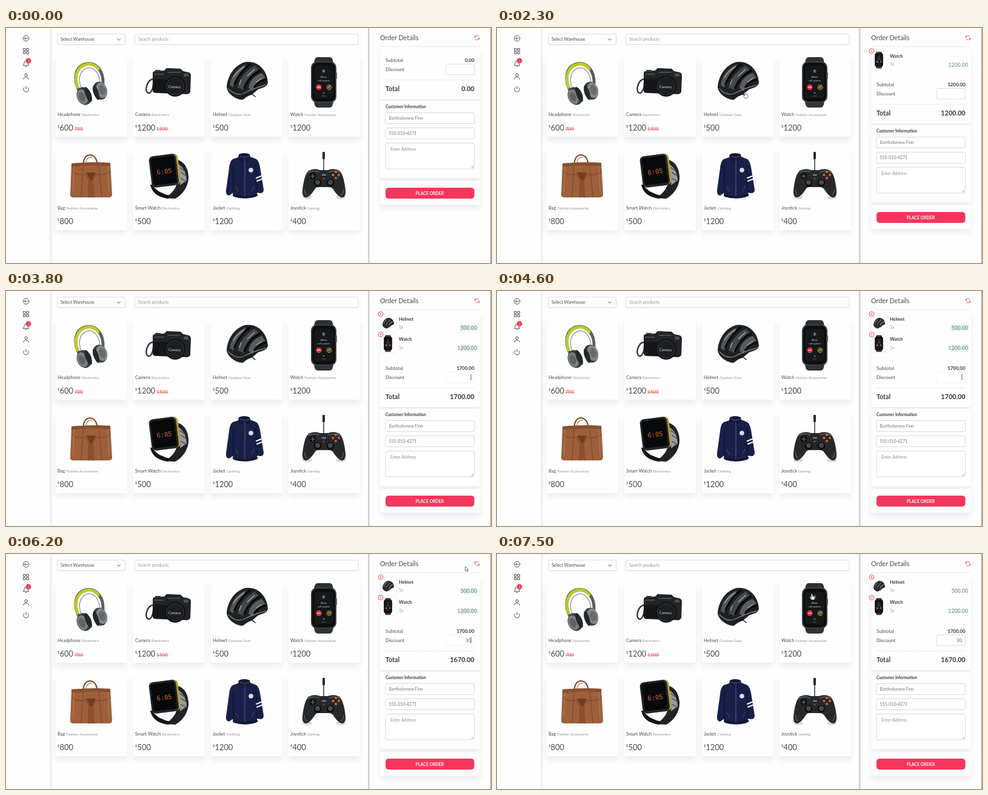
Recreate the animation shown at these times as an HTML page. Size 800 px wide and 387 px high, loop 8000 ms.

```html
<!DOCTYPE html>
<html lang="en">
<head>
<meta charset="utf-8">
<title>Point of sale</title>
<style>
html, body { margin: 0; width: 100%; height: 100%; overflow: hidden; background: #fefefe; }
svg { display: block; width: 100vw; height: 100vh; font-family: Lato, "Open Sans", sans-serif; fill: #4a4a4a; }
.line { fill: none; stroke: #505050; stroke-width: 1; stroke-linecap: round; stroke-linejoin: round; }
.box { fill: #fff; stroke: #d6d6d6; stroke-width: .9; }
.card { fill: #fefefe; filter: url(#soft); }
.bold { font-weight: 700; fill: #383838; }
.mute { fill: #929292; }
.red { fill: none; stroke: #e2474c; stroke-width: .9; }
.end { text-anchor: end; }
.mid { text-anchor: middle; }
</style>
</head>
<body>
<svg id="stage" viewBox="0 0 800 387" preserveAspectRatio="none"></svg>
<script>
const LOOP = 8000;
const stage = document.getElementById('stage');

const text = (x, y, size, str, cls = '', extra = '') =>
  `<text x="${x}" y="${y}" font-size="${size}" class="${cls}" ${extra}>${str}</text>`;
const rect = (x, y, w, h, r, attrs) =>
  `<rect x="${x}" y="${y}" width="${w}" height="${h}" rx="${r}" ${attrs}/>`;
const path = (d, attrs) => `<path d="${d}" ${attrs}/>`;
const dot = (x, y, r, fill) => `<circle cx="${x}" cy="${y}" r="${r}" fill="${fill}"/>`;
const oval = (x, y, rx, ry, fill) => `<ellipse cx="${x}" cy="${y}" rx="${rx}" ry="${ry}" fill="${fill}"/>`;
const turn = (deg, x, y, body) => `<g transform="rotate(${deg} ${x} ${y})">${body}</g>`;
const stroke = (color, width) =>
  `fill="none" stroke="${color}" stroke-width="${width}" stroke-linecap="round" stroke-linejoin="round"`;
const fill = color => `fill="${color}"`;

// Each drawing sits at its place in the shop grid.
const art = {
  headphone:
    path('M121 104C110 84 114 63 132 59C150 56 161 72 160 92', stroke('#5b5e61', 5)) +
    path('M118 97C112 80 117 64 132 60C140 58 147 61 152 67', stroke('#bccb27', 5)) +
    path('M124 99C118 83 122 70 134 66C146 63 154 76 155 90', stroke('#9da0a1', 1.6)) +
    turn(-22, 129, 112, oval(129, 112, 12, 15, '#3b3e41') + oval(126, 112, 8.5, 12.5, '#7c7f81') +
      oval(125, 112, 5, 8, '#5e6264') + oval(136, 112, 4.5, 13, '#25282a')) +
    turn(-18, 156, 103, oval(155, 103, 11.5, 15, '#3a3d40') + oval(158, 103, 9, 13, '#858889') +
      oval(159, 103, 5.5, 8.5, '#676b6d') + oval(148, 104, 4, 12.5, '#25282a')),
  camera:
    path('M243 84C233 85 229 101 233 106C238 111 243 100 243 91', stroke('#34363a', 2.4)) +
    path('M242 75Q242 71 246 71L261 70L265 66L288 67L292 71L301 73Q305 74 305 79L304 105Q303 108 299 109L247 107Q242 107 242 102Z', fill('#212327')) +
    path('M242 84L265 84L265 107L246 106Q242 106 242 102Z', fill('#15161a')) +
    path('M267 73L287 73M245 76L260 76', stroke('#56595d', 1.4)) +
    rect(246, 69, 9, 3, 1, fill('#36393d')) + rect(293, 75, 8, 5, 1, fill('#4a4d52')) +
    dot(279, 96, 17, '#0e0f12') +
    '<circle cx="279" cy="96" r="14.5" fill="#1c1e21" stroke="#3c3f43"/>' +
    text(278, 99, 6, 'Camera', 'mid', 'style="fill:#e2e2e2" transform="rotate(2 278 97)"'),
  helmet:
    path('M364 98C365 80 376 61 395 56C416 53 431 70 432 90C430 98 423 98 416 101L405 110Q399 111 391 118C382 119 366 110 364 98Z', fill('#1f2123')) +
    path('M369 94C371 79 382 65 396 60L390 71C381 79 376 88 375 98Z', fill('#54575a')) +
    path('M382 98C384 84 396 70 410 62L417 68C404 76 394 87 392 102Z', fill('#45484b')) +
    path('M400 99C402 86 410 78 422 74L428 82C416 86 409 93 407 103Z', fill('#5a5d60')) +
    path('M377 92Q385 73 402 60M393 99Q400 80 419 70M410 97Q416 88 428 85', stroke('#08090a', 3.2)) +
    path('M367 100Q378 112 391 108Q406 100 428 94', stroke('#7c7f82', 1.3)) +
    path('M375 81Q382 70 393 64M398 79L410 68M413 89L422 83M385 93L388 85', stroke('#b2b4b6', 1.1)) +
    path('M388 113L405 108L411 113', stroke('#17181a', 1.6)),
  watch:
    path('M507 62L509 53Q510 48 515 48L533 48Q538 48 539 53L541 62Z', fill('#2e3033')) +
    path('M507 116L509 126Q510 131 515 131L533 131Q538 131 539 126L541 116Z', fill('#303235')) +
    rect(503, 55, 42, 68, 10, fill('#3d4043')) + rect(505, 57, 38, 64, 8.5, fill('#0c0d0e')) +
    rect(544, 73, 2, 11, 1, fill('#5a5d60')) + rect(508, 62, 32, 54, 6, fill('#151719')) +
    dot(524, 71, 3, '#3d4144') + path('M524 69.5V72.5', stroke('#d4d8da', 1)) +
    text(524, 82, 4.2, 'Allow', 'mid', 'style="fill:#d5d5d5"') +
    text(524, 87.5, 4.2, 'call system', 'mid', 'style="fill:#d0d0d0"') +
    dot(516, 97.5, 4.7, '#e5333c') + path('M513.8 98Q516 96 518.2 98', stroke('#fff', 1.1)) +
    '<circle cx="533" cy="97.5" r="4" fill="#5c4a25" stroke="#d4b44b" stroke-dasharray="2 1"/>' +
    path('M531 98L535 96', stroke('#f0dfa0', .9)) +
    dot(524, 107, .9, '#bbb') + path('M521 112H527', stroke('#66696c', .8)),
  bag:
    path('M127 230C127 214 132 209 139 209C147 210 151 218 151 231', stroke('#7d4828', 2.2)) +
    path('M131 226C132 215 136 212 142 213', stroke('#b97b50', 1.2)) +
    path('M108 223Q140 220 172 222L175 274Q175 279 169 279L111 279Q105 279 106 273Z', fill('#9d603a')) +
    path('M108 223Q140 220 172 222L172 228Q140 224 108 229Z', fill('#865031')) +
    path('M109 236Q118 244 131 241L137 250L136 279M172 236Q162 244 149 241L143 250L145 279', stroke('#7d4727', 1.2)) +
    path('M132 238L148 238L142 251L139 251Z', fill('#6f3d22')) +
    path('M137 251L143 251L145 279L136 279Z', fill('#8b5230')) +
    path('M127 224L124 278M153 224L158 278', stroke('#88502e', 1.8)) +
    path('M112 228L111 270M168 228L170 270', stroke('#b0744b', 1.5)),
  smart:
    path('M276 217C290 215 300 227 301 244C302 258 293 274 279 281L262 280C277 271 284 259 283 244Z', fill('#202225')) +
    path('M284 224Q297 232 298 251L287 259Q289 243 279 231Z', fill('#9a9c9e')) +
    path('M287 230L294 235M289 238L297 243M289 248L297 252', stroke('#55585b', 1.8)) +
    path('M241 258Q250 272 271 276L268 281Q242 278 238 258Z', fill('#131416')) +
    turn(-7, 261, 236, rect(241, 209, 45, 51, 7, fill('#b79c38')) +
      rect(238, 209, 45, 52, 7, fill('#232528')) + rect(241, 212, 39, 45, 4, fill('#08090b')) +
      text(261, 240, 10.5, '6:05', 'mid', 'style="font-family:\'DejaVu Sans Mono\',monospace;fill:#d9692f"')),
  jacket:
    path('M383 213Q394 204 403 212L413 216Q418 219 420 235L425 266Q425 272 419 272L414 271L414 277Q396 284 376 278L375 271L368 276Q362 275 363 267L368 231Q369 219 374 216Z', fill('#182047')) +
    path('M375 227L375 276M412 225L414 271', stroke('#0e1530', 1.6)) +
    path('M383 214L384 208Q393 204 402 208L403 213L394 222Z', fill('#131a38')) +
    path('M386 211Q394 215 401 211M394 216V279', stroke('#5f6a90', .9)) +
    path('M413 247L423 243M414 252L424 248', stroke('#eef0f3', 2.2)) +
    path('M376 276Q395 281 414 275', stroke('#0f1630', 3)) +
    path('M379 261L383 269M409 260L405 269', stroke('#434e73', 1)) + dot(404, 234, 3.8, '#d9dde5'),
  joystick:
    oval(497, 279, 8, 3, '#d9d9d9') + oval(552, 279, 8, 3, '#d9d9d9') +
    path('M524 234V215', stroke('#35373a', 1.5)) + rect(522, 204, 4, 12, 1, fill('#292b2e')) +
    path('M499 235Q509 230 518 234L531 234Q541 230 550 235Q557 241 560 267Q561 280 553 279Q547 277 540 266Q537 262 533 262H515Q511 262 509 266Q502 277 496 279Q488 280 489 267Q492 241 499 235Z', fill('#26282a')) +
    path('M498 238Q508 233 516 237M533 237Q542 233 551 238', stroke('#606366', 1.5)) +
    path('M492 266Q493 272 496 275M557 266Q556 272 553 275', stroke('#4b4e51', 2)) +
    dot(506, 244, 5.5, '#0e0f11') + path('M503 244H509M506 241V247', stroke('#5d6064', 1.6)) +
    [514, 535].map(x => dot(x, 255, 6.2, '#0b0c0d') + dot(x, 254.2, 4, '#46494c')).join('') +
    [[544, 237], [539.5, 242], [549, 242], [544, 247]].map(([x, y]) => dot(x, y, 2, '#dd6530')).join('') +
    rect(521, 241, 7, 2, 1, fill('#898c8f')) + dot(524, 248, 1.2, '#c94b31')
};

const goods = [
  ['Headphone', 'Electronics', 600, 700], ['Camera', 'Electronics', 1200, 1500],
  ['Helmet', 'Outdoor Gear', 500], ['Watch', 'Fashion Accessories', 1200],
  ['Bag', 'Fashion Accessories', 800], ['Smart Watch', 'Electronics', 500],
  ['Jacket', 'Clothing', 1200], ['Joystick', 'Gaming', 400]
];

function product([name, kind, price, old], i) {
  const x = 85 + i % 4 * 128, y = i < 4 ? 0 : 154;
  const was = old ? `<tspan dx="2" font-size="8" fill="#df4a50" text-decoration="line-through">${old}</tspan>` : '';
  return text(x, y + 145, 7.45, `${name}<tspan dx="2" font-size="6" class="mute">${kind}</tspan>`) +
    text(x, y + 164.2, 6, '$') + text(x + 3.6, y + 169.4, 12.8, price + was);
}

const cards = goods.map((g, i) =>
  rect(82 + i % 4 * 128, 46 + (i < 4 ? 0 : 154), 118, 133, 2, 'class="card"')).join('');

const sidebar =
  rect(72, 0, 6, 387, 0, 'fill="url(#edge)"') +
  `<g class="line"><circle cx="33" cy="17" r="4.7"/>` +
  path('M35.5 17H30.5M32.5 15L30.5 17L32.5 19', '') +
  [[28.7, 33.7], [34, 33.7], [28.7, 39], [34, 39]].map(([x, y]) => rect(x, y, 3.5, 3.5, .3, '')).join('') +
  path('M28.5 61.5Q30 60 30 57.5Q30 54.5 33 54.5Q36 54.5 36 57.5Q36 60 37.5 61.5ZM32 63.3H34', '') +
  `<circle cx="33" cy="77.4" r="2.2"/>` + path('M28.8 84.2Q28.8 81 33 81Q37.2 81 37.2 84.2', '') +
  path('M33 96V100.5M30 98A4.2 4.2 0 1 0 36 98', '') + '</g>' +
  dot(37, 54, 4.4, '#f03350') + text(37, 56.1, 5.6, '2', 'mid', 'style="fill:#fff"');

const orderRow = (id, name, thumb) => `<g id="${id}">` +
  rect(618, 38, 26, 30, 2, 'fill="#fff" stroke="#ededed" stroke-width=".8"') + thumb +
  `<circle cx="618" cy="38" r="4" class="red" style="fill:#fff"/>` +
  path('M616.5 36.5L619.5 39.5M619.5 36.5L616.5 39.5', 'class="red"') +
  text(648, 48.5, 7.4, name, 'bold') + text(648, 62, 6.6, '1x', 'mute') +
  rect(748, 56, 30, 10, 3, 'class="glow" fill="#e3f6ed" filter="url(#blur)"') +
  text(777, 63.8, 8.8, name === 'Helmet' ? '500.00' : '1200.00', 'end bold price') + '</g>';

const mini = (name, x, y, cx, cy, s) =>
  `<g transform="translate(${x} ${y}) scale(${s}) translate(${-cx} ${-cy})">${art[name]}</g>`;

const summary = '<g id="summary">' +
  text(626, 56, 7.9, 'Subtotal') + text(772.5, 56, 7.9, '', 'end bold', 'id="sub"') +
  text(626, 71, 7.9, 'Discount') + rect(725.5, 59.5, 47, 17.5, 2, 'id="field" class="box"') +
  text(767, 71, 7.9, '', 'end', 'id="discount" style="fill:#666"') +
  rect(766.5, 63, .9, 10, 0, 'id="caret" fill="#444"') +
  path('M626 85.5H773', 'stroke="#dadada" stroke-width=".8" stroke-dasharray="2 1"') +
  text(626, 104, 10.6, 'Total', 'bold') + text(772.5, 104, 10.8, '', 'end bold', 'id="total"') +
  rect(617, 120, 165, 127, 2, 'class="card"') +
  text(626, 132.4, 6.8, 'Customer Information', 'bold') +
  [[139.5, 18], [164.5, 18], [189.5, 42.5]].map(([y, h]) => rect(626, y, 146.5, h, 2, 'class="box"')).join('') +
  text(631.5, 151, 7, 'Bartholomew Finn', '', 'style="fill:#777"') +
  text(631.5, 176, 7, '555-010-4271', '', 'style="fill:#777"') +
  text(634, 201.5, 7, 'Enter Address', 'mute') +
  path('M767.5 230.5L771 227M769.5 230.5L771 229', 'stroke="#777" stroke-width=".7"') +
  rect(617, 252, 165, 39, 2, 'class="card"') +
  rect(626, 263, 146.5, 18, 5, 'fill="#f5365c"') +
  text(699, 274.5, 6.9, 'PLACE ORDER', 'mid', 'style="fill:#fff" font-weight="700"') + '</g>';

stage.innerHTML = `<defs>
  <filter id="soft" x="-20%" y="-20%" width="140%" height="150%">
    <feDropShadow dx="0" dy="6" stdDeviation="4.5" flood-color="#000" flood-opacity=".07"/></filter>
  <filter id="blur" x="-30%" y="-50%" width="160%" height="200%"><feGaussianBlur stdDeviation="1.5"/></filter>
  <linearGradient id="edge"><stop stop-color="#ececec"/><stop offset="1" stop-color="#fefefe"/></linearGradient>
  </defs>` +
  sidebar + cards +
  rect(85, 10, 111.5, 17.5, 2, 'class="box"') + text(90, 21.4, 7.05, 'Select Warehouse') +
  path('M183.5 17.8L186 20.2L188.5 17.8', 'class="line"') +
  rect(212.5, 10, 368.5, 17.5, 2, 'class="box"') + text(218, 21.4, 7.1, 'Search products', 'mute') +
  Object.values(art).join('') + goods.map(product).join('') +
  rect(597, 0, 2.6, 387, 0, 'fill="#d0d0d0"') + rect(799, 0, 1, 387, 0, 'fill="#999"') +
  rect(617, 34, 165, 83, 2, 'id="panel" class="card"') +
  text(617, 19.6, 10.8, 'Order Details') + path('M617 30.5H782', 'stroke="#e6e6e6" stroke-width=".8"') +
  path('M773 15.2A4 4 0 0 1 780 14M780.6 16.8A4 4 0 0 1 773.8 18.2M773 12.8V15.2H775.4M780.7 19.3V16.8H778.3', 'class="red"') +
  orderRow('helmetRow', 'Helmet', mini('helmet', 630.5, 53, 398, 87, .28)) +
  orderRow('watchRow', 'Watch', mini('watch', 630, 53, 524, 90, .33)) +
  summary +
  `<g id="cursor" fill="#fff" stroke="#555" stroke-width=".8" stroke-linejoin="round">
    <path id="arrow" d="M-1.5 -3.5V4L.3 2.4L1.5 5L2.8 4.4L1.6 1.9H4Z"/>
    <path id="hand" d="M-1.6 -4Q-.6 -5 .3 -4L.5 -.5Q3.8 -.8 4 1V3Q3.8 5 2.5 5.5H-1.2L-4 1.6Q-3.8 .2 -2.6 .8L-1.6 1.8Z"/></g>`;

const $ = id => document.getElementById(id);
const show = (id, on) => { $(id).style.display = on ? '' : 'none'; };
const move = (id, x, y) => $(id).setAttribute('transform', `translate(${x} ${y})`);
const prices = [...document.querySelectorAll('.price')];
const glows = [...document.querySelectorAll('.glow')];

// time, x, y
const route = [
  [400, 590, 205], [900, 523, 98], [1700, 523, 98], [2300, 410, 110], [2800, 410, 110],
  [3400, 752, 142], [5500, 752, 142], [6200, 759, 24], [6400, 771, 18], [6600, 756, 25],
  [6700, 756, 25], [6900, 680, 44], [7200, 680, 44], [7500, 520, 70], [8000, 520, 70]
];

function pointer(t) {
  const i = Math.max(1, route.findIndex(p => t <= p[0]));
  const a = route[i - 1], b = route[i];
  const k = Math.max(0, (t - a[0]) / (b[0] - a[0])), e = k * k * (3 - 2 * k);
  return [a[1] + (b[1] - a[1]) * e, a[2] + (b[2] - a[2]) * e];
}

const between = (t, a, b) => t >= a && t < b;

function draw(time) {
  const t = Math.floor(time % LOOP / 100) * 100;
  const watch = t >= 1400, helmet = t >= 2700;
  const shift = helmet ? 74 : watch ? 40 : 0;
  const sum = (watch ? 1200 : 0) + (helmet ? 500 : 0);
  const typed = t >= 5000 ? '30' : t >= 4800 ? '3' : '';
  const focus = between(t, 3700, 6800);

  show('watchRow', watch);
  show('helmetRow', helmet);
  move('watchRow', 0, helmet ? 33.7 : 0);
  move('summary', 0, shift);
  $('panel').setAttribute('height', 83 + shift);
  $('sub').textContent = sum.toFixed(2);
  $('discount').textContent = typed;
  $('total').textContent = (sum - typed).toFixed(2);
  $('field').style.stroke = focus ? '#f3f3f3' : '#dadada';
  show('caret', between(t, 3700, 4200) || between(t, 4600, 5400) || between(t, 5800, 6400));

  const tone = t < 1800 ? '#adadad' : t < 2700 ? '#8fae92' : t < 7300 ? '#87998f' : '#76a88a';
  prices.forEach(p => { p.style.fill = tone; });
  glows.forEach(g => { g.style.opacity = between(t, 2700, 7300) ? 1 : 0; });

  const [x, y] = pointer(t);
  const overShop = x < 588;
  show('cursor', t >= 500 && !between(t, 3700, 5600));
  show('hand', overShop);
  show('arrow', !overShop);
  move('cursor', x, y);
}

const start = performance.now();
function tick() {
  draw(performance.now() - start);
  requestAnimationFrame(tick);
}
tick();
</script>
</body>
</html>
```
